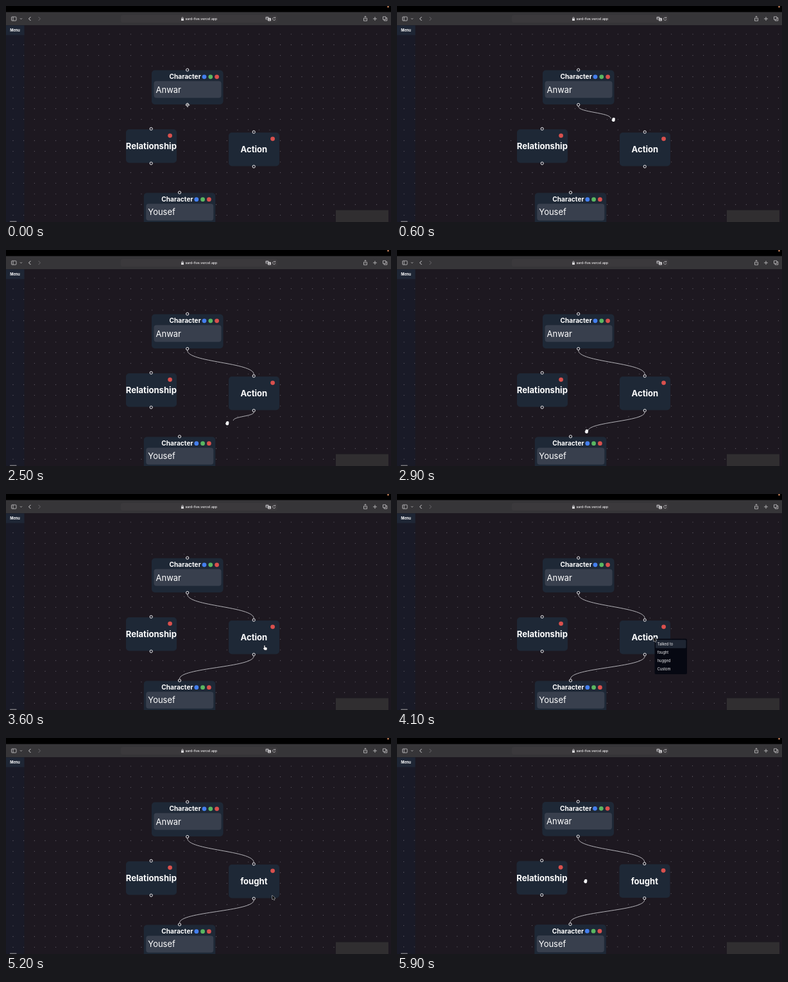
Animation of 600 by 338 pixels, one loop 6 s. Source, as an HTML page with a canvas:

```html
<!DOCTYPE html>
<html lang="en">
<head>
<meta charset="utf-8">
<title>Story graph</title>
<style>
  html, body { margin: 0; width: 100%; height: 100%; overflow: hidden; background: #1d1820; }
  canvas { display: block; width: 600px; height: 338px; }
</style>
</head>
<body>
<canvas id="stage" width="600" height="338"></canvas>
<script>
const ctx = document.getElementById('stage').getContext('2d');
const LOOP = 6000, STEP = 100, GAP = 16.667, PORT = 2.6;
const FONT = 'Inter, "Liberation Sans", sans-serif';
const BLUE = '#447fee', GREEN = '#5ab761', RED = '#d9504d', NODE = '#1e2836';

// Pointer path: time, x, y
const path = [
  [0, 283, 155], [200, 283, 155], [500, 318, 170], [900, 396, 201], [1000, 388, 198],
  [1200, 388, 198], [1300, 399, 226], [1400, 400, 230], [1700, 387, 252],
  [2400, 387, 252], [2500, 345, 271], [2800, 304, 282], [3100, 279, 287],
  [3300, 279, 287], [3400, 314, 272], [3600, 404, 240.5], [4000, 401, 227],
  [4300, 401, 227], [4700, 414, 246], [5000, 416, 249], [5400, 416, 249],
  [5600, 360, 238], [5800, 297, 224], [5900, 294, 224], [6000, 294, 224]
];

function pointerAt(t) {
  const i = Math.max(1, path.findIndex(p => p[0] >= t));
  const [t0, x0, y0] = path[i - 1], [t1, x1, y1] = path[i];
  const k = (t - t0) / (t1 - t0);
  return [x0 + (x1 - x0) * k, y0 + (y1 - y0) * k];
}

function box(x, y, w, h, r, fill) {
  ctx.beginPath();
  ctx.roundRect(x, y, w, h, r);
  ctx.fillStyle = fill;
  ctx.fill();
}

function disc(x, y, r, fill) {
  ctx.beginPath();
  ctx.arc(x, y, r, 0, 7);
  ctx.fillStyle = fill;
  ctx.fill();
}

function label(str, x, y, size, weight = 400, align = 'left', fill = '#fff') {
  ctx.font = `${weight} ${size}px ${FONT}`;
  ctx.textAlign = align;
  ctx.fillStyle = fill;
  ctx.fillText(str, x, y);
}

function stroke(d, color = '#c9c8ca', width = 0.8) {
  ctx.strokeStyle = color;
  ctx.lineWidth = width;
  ctx.stroke(new Path2D(d));
}

function handle(x, y) {
  disc(x, y, 2.1, '#1a1925');
  ctx.strokeStyle = '#f4f4f5';
  ctx.lineWidth = 1;
  ctx.stroke();
}

function edge(x0, y0, x1, y1) {
  const my = (y0 + y1) / 2;
  stroke(`M${x0} ${y0}C${x0} ${my} ${x1} ${my} ${x1} ${y1}`, '#bdbcc1', 0.95);
}

function character(x, y, name) {
  box(x, y, 111.5, 53.5, 5, NODE);
  label('Character', x + 27.5, y + 13.9, 10.15, 700);
  [BLUE, GREEN, RED].forEach((c, i) => disc(x + 82 + i * 9.8, y + 10.3, 3.4, c));
  box(x + 3.5, y + 17, 105, 26.3, 4, '#383f4d');
  label(name, x + 6.5, y + 35, 13);
  handle(x + 55.7, y - 0.5);
  handle(x + 55.7, y + 54);
}

function topic(x, y, title) {
  box(x, y, 79, 52.5, 5, NODE);
  label(title, x + 39.3, y + 31, 13.1, 700, 'center');
  disc(x + 68.6, y + 9.8, 3.4, RED);
  handle(x + 39.2, y - 0.8);
  handle(x + 39.2, y + 53.2);
}

function browserBar() {
  box(0, 0, 600, 10, 0, '#000');
  disc(595.5, 1.2, 1.2, '#d98d62');
  box(0, 9.5, 600, 20.5, 0, '#363538');
  box(179, 14, 244, 12, 3, '#3b393c');
  stroke('M9.5 17h5.5q1 0 1 1v4q0 1-1 1h-5.5q-1 0-1-1v-4q0-1 1-1zM11 17v6');
  stroke('M22 19.2l1.5 1.5 1.5-1.5');
  stroke('M38.5 17l-3 3 3 3', '#d4d3d5', 1);
  stroke('M50.5 17l3 3-3 3', '#69676b', 1);
  box(273, 19.6, 4, 3.4, 0.6, '#d6d5d7');
  stroke('M273.8 20v-1.2a1.2 1.2 0 0 1 2.4 0v1.2', '#d6d5d7', 0.7);
  label('sard-five.vercel.app', 279.5, 22.1, 5.15, 500, 'left', '#f0eff1');
  box(404.5, 16.8, 5, 4.6, 1, '#a9a8ab');
  box(408, 18.8, 5, 4.6, 1, '#d0cfd1');
  label('A', 407, 20.8, 4, 600, 'center', '#2c2a2e');
  label('文', 410.5, 22.5, 3.3, 400, 'center', '#2c2a2e');
  stroke('M419.4 18.7a2.2 2.2 0 1 0 .5 1.9M418 18.7h1.7v-1.7', '#c4c3c6', 0.7);
  stroke('M558.7 19h-1.2v4.2h5v-4.2h-1.2M560 21v-5M558.5 17.3l1.5-1.5 1.5 1.5');
  stroke('M572 20h6M575 17v6');
  stroke('M587.5 16.8h4.4v4.4h-4.4zM589.2 21.2v1.8h4.6v-4.5h-1.9');
}

function dots(shift) {
  for (let y = 44; y < 338; y += GAP)
    for (let x = 11; x < 600; x += GAP)
      disc(x + shift, y + shift, 0.55, '#6f6b75');
}

function contextMenu(active) {
  box(401.5, 226.5, 50.5, 55.5, 2, '#060812');
  box(403, 228.3 + active * 13, 47.5, 13, 1.5, '#1e2532');
  ['Talked to', 'fought', 'hugged', 'Custom'].forEach((s, i) =>
    label(s, 405.7, 236.9 + i * 13.1, 5.7, 400, 'left', '#f0f0f2'));
}

const shapes = {
  arrow: 'M-1-3v6.6l1.5-1.3 1.1 2.4 1.2-.6-1.1-2.3h2z',
  point: 'M-1.7-3.5q.8-.7 1.3.2v2.5l2.4.6q1 .3.8 1.4l-.5 2.6h-3.4l-2-2.5q-.4-1 .5-.9l.8.6z',
  grab: 'M-2.2 0v-2q.6-.9 1.1 0 .1-1.6 1.1-.9.8-.7 1.1.4 1-.5 1.2.6v2.5q0 2.5-1.8 2.7h-1.3q-1 0-2.1-2.2-.7-1.3.7-1.1z'
};

function pointer(kind, x, y) {
  ctx.save();
  ctx.translate(x, y);
  if (kind === 'cross') {
    stroke('M-3.2 0h6.4M0-3.2v6.4', '#e8e8ea', 1.6);
    stroke('M-2.8 0h5.6M0-2.8v5.6', '#333238', 0.7);
  } else {
    const dark = kind === 'arrow';
    stroke(shapes[kind], dark ? '#d8d8dc' : '#17151c', 1);
    ctx.fillStyle = dark ? '#111' : '#f3f3f5';
    ctx.fill(new Path2D(shapes[kind]));
  }
  ctx.restore();
}

function pointerKind(t) {
  if (t < 300 || (t >= 1000 && t < 1300) || (t >= 1700 && t < 2400)) return 'cross';
  if (t < 3200) return 'grab';
  if (t < 4100) return 'point';
  return t < 5500 ? 'arrow' : 'grab';
}

function draw(t) {
  const pan = t >= 5900 ? -0.5 : 0;
  const [px, py] = pointerAt(t);
  // The loose end of a new edge trails the pointer a little
  const [lx, ly] = pointerAt(Math.max(0, t - 22));

  box(0, 0, 600, 338, 0, '#1d1820');
  box(0, 30, 28.5, 308, 0, '#191a27');
  dots(pan);

  ctx.save();
  ctx.translate(pan, pan);
  if (t >= 1000) edge(282.7, 154.5 + PORT, 386.2, 197.2 - PORT);
  else if (t >= 300) edge(282.7, 154.5 + PORT, lx, ly);
  if (t >= 3100) edge(386.2, 251.2 + PORT, 270.5, 291.9 - PORT);
  else if (t >= 2500) edge(386.2, 251.2 + PORT, lx, ly);
  character(227, 100.5, 'Anwar');
  topic(187, 193, 'Relationship');
  topic(347, 198, t >= 5200 ? 'fought' : 'Action');
  character(214.8, 292.4, 'Yousef');
  ctx.restore();

  box(514, 319.5, 82, 19, 0, '#302e30');
  box(6, 336.6, 10.5, 2, 0.5, '#77767b');
  box(0, 30.5, 28.5, 15, 0, '#1e2635');
  label('Menu', 6.2, 40.4, 5.6, 700);
  browserBar();
  if (t >= 4100 && t < 5200) contextMenu(t >= 4800 ? 1 : 0);
  pointer(pointerKind(t), px, py);
}

const start = performance.now();
let last = -1;
function tick() {
  const t = Math.floor((performance.now() - start) % LOOP / STEP) * STEP;
  if (t !== last) draw(last = t);
  requestAnimationFrame(tick);
}
tick();
</script>
</body>
</html>
```
